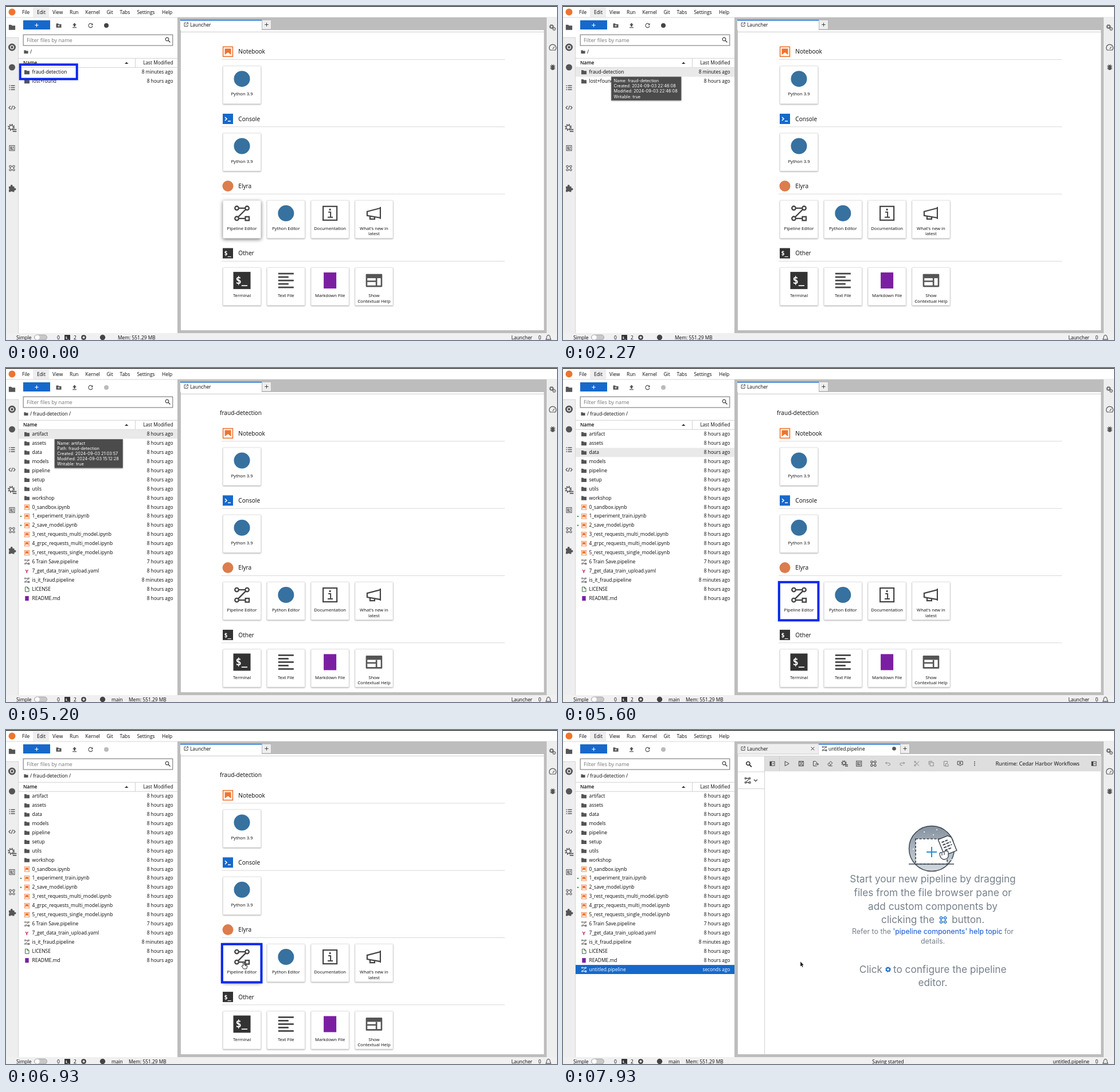
These frames come from a looping animation (961x583 px, 8000 ms). An HTML page:

```html
<!DOCTYPE html>
<html lang="en">
<head>
<meta charset="utf-8">
<title>Notebook workspace</title>
<style>
html, body { margin: 0; width: 100%; height: 100%; overflow: hidden; background: #fff; }
svg { display: block; font-family: "Open Sans", "Noto Sans", sans-serif; }
.card { filter: drop-shadow(0 1px 1px #0005); }
.lift { filter: drop-shadow(0 2px 3px #0008); }
.sans { font-family: Inter, "Liberation Sans", sans-serif; }
.mono { font-family: "DejaVu Sans Mono", monospace; font-weight: bold; }
</style>
</head>
<body>
<svg id="stage" width="961" height="583" viewBox="0 0 961 583"></svg>
<script>
const INK = "#0a0a0a", ICON = "#555", BLUE = "#1669cb", ORANGE = "#ee7430", PURPLE = "#7b1fa2";
const LOOP = 8000;

// Drawing helpers
const text = (x, y, s, size = 8.4, fill = INK, more = "") =>
  `<text x="${x}" y="${y}" font-size="${size}" fill="${fill}" ${more}>${s}</text>`;
const END = 'text-anchor="end"', MID = 'text-anchor="middle"', SANS = 'class="sans"';
const rect = (x, y, w, h, fill = "none", stroke = "none", sw = 1, more = "") =>
  `<rect x="${x}" y="${y}" width="${w}" height="${h}" fill="${fill}" stroke="${stroke}" stroke-width="${sw}" ${more}/>`;
const disc = (x, y, r, fill = "none", stroke = "none", sw = 1) =>
  `<circle cx="${x}" cy="${y}" r="${r}" fill="${fill}" stroke="${stroke}" stroke-width="${sw}"/>`;
const line = (d, stroke = ICON, sw = 1, more = "") =>
  `<path d="${d}" fill="none" stroke="${stroke}" stroke-width="${sw}" ${more}/>`;
const fill = (d, color = ICON) => `<path d="${d}" fill="${color}"/>`;
const at = (x, y, body, k = 1, turn = 0) =>
  `<g transform="translate(${x} ${y}) scale(${k}) rotate(${turn})">${body}</g>`;

// Icons, centred on the origin
const folder = c => fill("M-4.5-3.5h3.4l1.1 1.2h4.5v6h-9z", c);
const notebook = rect(-8.4, -8.4, 16.8, 16.8, "#fff", ORANGE, 1.6) + fill("M-5.5-5.5h11v11l-5.4-4.3-5.6 4.3z", ORANGE);
const terminal = rect(-15, -15, 30, 30, "#333") + text(-11, 6, "$_", 17, "#fff", 'class="mono"');
const consoleIcon = rect(-9, -9, 18, 18, BLUE) + line("M-5-3l3 3-3 3M0 4h5", "#fff", 1.6);
const pipeline = (c = "#444", w = 2.3) =>
  line("M-6-9H6M7-7L-7 7M-6 9H6", c, w) +
  [[-9, -9], [9, -9], [-9, 9]].map(p => disc(...p, 3.3, "none", c, w)).join("") +
  rect(6, 6, 6.5, 6.5, "none", c, w);
const info = rect(-12, -12, 24, 24, "none", "#444", 2.2) +
  line("M-3-2H1V7M-4 7H5", "#444", 2) + rect(-1.5, -8, 3, 3, "#444");
const horn = line("M-12-3L11-9V8L-12 4zM-7 5v5h8V7M11-11V10", "#444", 2.2);
const lines = line("M-13.5-12H13.5M-13.5-6H4.5M-13.5 0H13.5M-13.5 6H4.5M-13.5 12H13.5", "#444", 2.8);
const help = line("M-13-10H13V10H-13zM-13 1.4H3.5M4.2-4V10", ICON, 2.6, 'stroke-linejoin="round"') + rect(-13, -10, 26, 6, ICON);
const python = disc(0, 0, 14, "#37719f");
const markdown = rect(-11, -14, 22, 28, PURPLE);
const search = (c = "#444") => disc(-1, -1, 2.8, "none", c, 1.2) + line("M1 1l3.4 3.4", c, 1.4);
const gear = (c = ICON, w = 1.5) =>
  disc(0, 0, 3, "none", c, w) +
  `<circle r="4.4" fill="none" stroke="${c}" stroke-width="1.5" stroke-dasharray="1.73"/>`;
const links = (c = ICON) => line("M-2-3H2M-2 3H2M-3-2V2M3-2V2", c, .8) +
  [[-3, -3], [3, -3], [-3, 3], [3, 3]].map(p => disc(...p, 1.7, "#fff", c, 1.1)).join("");
const parts = c => rect(-4.5, -4.5, 9, 9, "none", c, 1) + line("M-3-2H0M-3 0H0M-3 2H3M2-3v3", c, 1.3);
const plus = (r, c, w) => line(`M${-r} 0H${r}M0 ${-r}V${r}`, c, w);
const newTab = line("M0-3H-3V3H3V0M1-3.5H3.5V-1M3.5-3.5L-1 1", "#444", .9);
const gearList = c => at(-1, -1, gear(c, 1.2), .9) + line("M1 2h5M1 4.5h5", c, 1.2);

const smallIcon = (name, color) => {
  const ext = name.includes(".") ? name.split(".").pop() : "";
  if (ext == "ipynb") return at(0, 0, notebook, .5);
  if (ext == "pipeline") return at(0, 0, pipeline(color, 2.8), .34);
  if (ext == "yaml") return text(-3, 4, "Y", 9, "#c2185b", 'font-weight="bold"');
  if (ext == "md") return at(0, 0, markdown, .29);
  if (name == "LICENSE") return line("M-3-4H1L3.5-1.5V4H-3zM1-4v2.5h2.5", "#3d6b3d", 1);
  return folder(color);
};

const shell = () => {
  let s = rect(0, 0, 961, 583, "#fff") + rect(0, 0, 961, 1.2, "#111") + rect(47, 2, 28, 17.5, "#eee");
  s += disc(10.5, 10.5, 6, ORANGE);
  [["File", 28], ["Edit", 54], ["View", 81], ["Run", 111], ["Kernel", 138.5], ["Git", 175.5],
   ["Tabs", 198.5], ["Settings", 228.5], ["Help", 272]].forEach(([m, x]) => s += text(x, 14.2, m));
  s += rect(0, 55, 22, 517, "#eee") + line("M0 20H961M21.7 55V571M0 55H22", "#ccc", .8);
  s += rect(299, 20, 645, 552, "#bdbdbd") + rect(943, 20, 18, 552, "#eee");
  s += rect(0, 571, 961, 12, "#f0f0f0");
  s += at(10.5, 37, folder(), 1.25);
  s += disc(10.5, 72, 5, "#fff", ICON, 3) + rect(8.5, 70, 4, 4, ICON);
  s += disc(10.5, 107, 5.5, ICON);
  s += at(10.5, 142.5, line("M-5-3.5h1.6M-5 0h1.6M-5 3.5h1.6M-2-3.5H5M-2 0H5M-2 3.5H5", ICON, 1.3));
  s += at(10.5, 177.5, line("M-2.5-3l-3 3 3 3M2.5-3l3 3-3 3M1-3.5L-1 3.5", ICON, 1.2));
  s += at(10.5, 213, gearList(ICON), 1.3) + at(10.5, 248, parts(ICON)) + at(10.5, 283, links());
  s += at(10.5, 318, fill("M-5.5-3h3a2 2 0 1 1 3.5 0h3v3a2 2 0 1 1 0 3.5v3H1a2 2 0 0 0-3.5 0h-3V3a2 2 0 0 0 0-3z"));
  s += at(951.5, 36, gear(), .8) + at(956, 40, gear(), .65);
  s += at(953.5, 73, line("M-4.5 4A6 6 0 1 1 4.5 4zM0 2L3-2", ICON, 1.2));
  s += at(953.5, 107, line("M-4.5-2.5h9M-4.5 0h9M-4.5 2.5h9M-2.5-5L0-3 2.5-5", ICON, 1) + rect(-2.8, -3.8, 5.6, 8.5, ICON, "none", 1, 'rx="2.5"'));
  return s;
};

const statusBar = st => text(18, 581.5, "Simple") +
  rect(49.5, 574, 22, 9, "#c8c8c8", "#999", .8, 'rx="4.5"') + disc(54.5, 578.5, 4, "#fff") +
  text(89, 581.5, "0") + at(107, 579, terminal, .33) + text(118, 581.5, "2") +
  at(135.5, 578.5, rect(-2.6, -2.6, 5.2, 5.2, "none", "#333", 1.6) + disc(0, 0, 4, "none", "#333", 1)) +
  disc(168.5, 578.5, 4.7, "#444") +
  (st.branch ? text(184, 581.5, "main") : "") +
  text(st.branch ? 214 : 195, 581.5, "Mem: 551.29 MB") +
  (st.saving ? text(567, 581.5, "Saving started", 8.4, INK, MID) : "") +
  text(918, 581.5, st.tab ? "untitled.pipeline" : "Launcher", 8.4, INK, END) + text(928.5, 581.5, "0") +
  at(946, 578.5, line("M-4.5 3.5C-2 1-4-4 0-4S2 1 4.5 3.5zM-1 5H1", "#333", 1));

// File browser
const ROOT = ["fraud-detection", "lost+found"];
const PROJECT = ("artifact,assets,data,models,pipeline,setup,utils,workshop,0_sandbox.ipynb,1_experiment_train.ipynb," +
  "2_save_model.ipynb,3_rest_requests_multi_model.ipynb,4_grpc_requests_multi_model.ipynb," +
  "5_rest_requests_single_model.ipynb,6 Train Save.pipeline,7_get_data_train_upload.yaml," +
  "is_it_fraud.pipeline,LICENSE,README.md").split(",");
const AGES = {
  "fraud-detection": "8 minutes ago", "is_it_fraud.pipeline": "8 minutes ago",
  "6 Train Save.pipeline": "7 hours ago", "untitled.pipeline": "seconds ago"
};

const browser = st => {
  let s = rect(30, 25, 47, 16, BLUE) + at(53.5, 33.5, plus(3.2, "#fff", 1.1));
  s += at(92, 34, folder()) + at(92, 34.5, plus(1.8, "#fff", .9));
  s += at(119.5, 34, fill("M0-4.5L3.5-.8H1.4V2h-2.8V-.8h-2.1zM-3.5 3h7v1.3h-7z"));
  s += at(147.5, 34, line("M3-2A3.6 3.6 0 1 0 3.5 1", ICON, 1.2) + fill("M4-4v3.5H.5z"));
  s += disc(175, 34, 4, st.dim ? "#bbb" : "#444");
  s += rect(30.2, 50.2, 260.5, 18.8, "#fff", "#8c8c8c", 1.3) + text(36, 63, "Filter files by name", 9.1, "#777");
  s += at(282, 59, search()) + at(35, 80, folder(), .8);
  s += text(42, 82.8, st.dir ? "/ fraud-detection /" : "/");
  s += line("M22 91.3H299M22 107.3H299M225.5 91V107", "#ccc", .9);
  s += text(30, 102, "Name", 8.4, INK, 'font-weight="600"') + fill("M207 101l3.2-3.3 3.2 3.3z", "#333");
  s += text(291.5, 102, "Last Modified", 8.3, INK, END);
  const names = st.dir ? PROJECT.concat(st.file ? ["untitled.pipeline"] : []) : ROOT;
  names.forEach((name, i) => {
    const y = 115.4 + 15.92 * i, on = i == st.sel, ink = on ? "#fff" : INK;
    if (on || i == st.hover) s += rect(22, y - 7.8, 277, 15.9, on ? BLUE : "#e9e9e9");
    if (st.dir && (i == 9 || i == 10)) s += disc(26, y + .2, 1.2, "#388e3c");
    s += at(36.5, y + .2, smallIcon(name, on ? "#fff" : ICON));
    s += text(45.5, y + 2.8, name, 8.45, ink) + text(291.5, y + 2.8, AGES[name] || "8 hours ago", 8.3, ink, END);
  });
  return s;
};

// Launcher
const SECTIONS = [
  ["Notebook", notebook, [["Python 3.9", python]]],
  ["Console", consoleIcon, [["Python 3.9", python]]],
  ["Elyra", disc(0, 0, 9.5, "#dd7c4c"), [["Pipeline Editor", pipeline()], ["Python Editor", python],
    ["Documentation", info], ["What's new in|latest", horn]]],
  ["Other", at(0, 0, terminal, .6), [["Terminal", terminal], ["Text File", lines],
    ["Markdown File", markdown], ["Show|Contextual Help", help]]]
];

const tab = (x, label, icon, active) =>
  rect(x, 24, 142, 18, active ? "#fff" : "#eee", active ? "none" : "#bbb", .7) +
  (active ? rect(x, 24, 142, 1.5, BLUE) : "") + at(x + 10, 32.5, icon) + text(x + 17, 35.5, label);
const addTab = x => rect(x + .5, 24.3, 16, 16.5, "#eee", "#aaa", .7) + at(x + 8.5, 32.5, plus(3.2, "#333", .9));
const panel = rect(304.3, 41.5, 634.5, 525, "#fff", "#adadad", .7) + line("M304 45.3H939", "#bbb", .8);

const launcher = st => {
  const dy = st.moved ? 34.3 : 0;
  let s = panel + tab(304, "Launcher", newTab, true) + addTab(446);
  if (st.moved) s += text(373, 82.2, "fraud-detection", 10.1);
  SECTIONS.forEach(([title, icon, cards], i) => {
    const y = 79.7 + 117.3 * i + dy;
    s += at(387, y, icon) + text(405.3, y + 3.7, title, 10.1);
    s += rect(376, y + 13.4, 494, .9, "#d5d5d5");
    cards.forEach(([label, pic], j) => {
      const x = 378.5 + 76.8 * j, lifted = st.lift && i == 2 && j == 0;
      s += rect(x, y + 25, 66, 66, "#fff", "#ddd", .7, `class="${lifted ? "lift" : "card"}" rx="1"`);
      s += at(x + 33, y + 47.5, pic);
      label.split("|").forEach((l, n) => s += text(x + 33, y + 76.7 + 9.4 * n, l, 7.7, INK, MID));
    });
  });
  return s;
};

// Pipeline editor
const TOOLS = [
  c => rect(-4, -3.5, 8, 7, "none", c) + rect(-4, -3.5, 3, 7, c) + line("M0 0h3", c),
  c => line("M-3-4L4 0-3 4z", c),
  c => rect(-4, -4, 8, 8, "none", c) + line("M-2-4v2.5h4V-4M-2 4V1h4v3", c),
  c => line("M2 4H-4V-4H0L2-2V0M-1 1H5M3-1L5 1 3 3", c),
  c => line("M-4 1L1-4 4-1-1 4H-2zM-2-1L1 2M-1 4H4", c),
  gearList, parts, links,
  c => line("M-2-3L-4-1-2 1M-4-1H2A2 2 0 0 1 2 3H0", c),
  c => line("M2-3L4-1 2 1M4-1H-2A2 2 0 0 0-2 3H0", c),
  c => line("M-2-2L4 4M-2 2L4-4", c) + disc(-3, -3, 1.3, "none", c) + disc(-3, 3, 1.3, "none", c),
  c => line("M-2-2H4V4H-2zM-4 2V-4H2", c),
  c => line("M-3-4H3V-1M-3-4V4H0M0 0H3L4.5 1.5V4.5H0z", c),
  c => line("M-4.5-4H4.5V2H1L0 4-1 2H-4.5zM-2-1H2M0-3V1", c),
  c => disc(0, -3, .9, c) + disc(0, 0, .9, c) + disc(0, 3, .9, c)
];

const emptyArt = () => {
  const dark = "#3d4753", gray = "#77818b", link = "#0f54d0";
  const big = (x, y, s, more = MID) => text(x, y, s, 17.2, gray, SANS + " " + more);
  let s = `<defs><linearGradient id="sky" x2="0" y2="1"><stop stop-color="#84919e"/><stop offset="1" stop-color="#d3d9df"/></linearGradient></defs>`;
  s += disc(643, 207, 39.5, "url(#sky)", dark, 1.5);
  s += [[630, 178], [646, 183], [652, 174], [611, 208], [677, 226]].map(p => disc(...p, 1, "#fff")).join("");
  s += rect(615, 190, 55, 44, "#fff", dark, 1.7, 'stroke-dasharray="4 2.5"') + line("M603 234H682", dark, 1.6);
  s += at(643, 213, plus(9, "#1f8fd6", 2));
  s += at(670, 201, line("M-11-15H7L12-10V15H-11z", dark, 1.5, 'style="fill:#fff"') +
    line("M-7-8H4M-7-3H8M-7 2H8M-7 7H6", dark, 2, 'stroke-dasharray="5 1.5"'), 1, -22);
  s += line("M657 217q-1-3 3-3l8-3q5 0 4 5v5q-2 5-8 5-6-1-7-9zM661 215v4M665 213v5", dark, 1.3, 'style="fill:#fff"');
  ["Start your new pipeline by dragging", "files from the file browser pane or", "add custom components by"]
    .forEach((l, i) => s += big(645, 265.7 + 23.9 * i, l));
  s += big(648, 337.4, "clicking the", END) + at(663, 331.5, links(BLUE), 1.2) + big(678, 337.4, "button.", "");
  s += text(645, 355.6, `Refer to the <tspan fill="${link}">'pipeline components' help topic</tspan> for`, 12.4, gray, SANS + " " + MID);
  s += text(645, 372.8, "details.", 12.4, gray, SANS + " " + MID);
  s += big(557, 423.5, "Click", END) + at(567, 418, gear(BLUE, 2), .95) + big(576, 423.5, "to configure the pipeline", "");
  return s + big(645, 447.3, "editor.");
};

const editor = st => {
  let s = panel + tab(304, "Launcher", newTab) + at(435.5, 32.5, line("M-2.8-2.8L2.8 2.8M-2.8 2.8L2.8-2.8", "#333", 1));
  s += tab(446, "untitled.pipeline", at(0, 0, pipeline("#444", 2.8), .32), true) + disc(577.5, 32.5, 3.3, "#555") + addTab(588);
  if (st.tools) {
    s += rect(352, 45.7, 587, 26.5, "#dedede") + line("M351.6 45V566M304 73H352M304 102.5H352M377.5 46V72", "#ccc", .9);
    s += at(324, 59.5, search("#111"), 1.1) + at(322, 88, pipeline("#444", 2.8), .4) + line("M333 86.5l3 3 3-3", "#333", 1.1);
    TOOLS.forEach((draw, i) => s += at(365 + 25.2 * i, 58.7, draw(i > 7 && i < 13 ? "#888" : "#444")));
    s += text(901, 62, "Runtime: Cedar Harbor Workflows", 9.2, INK, END) + at(926, 58.7, TOOLS[0]("#444"));
  }
  return s + (st.art ? emptyArt() : "");
};

// Overlays
const TIPS = [, [84.3, 123.8, 121.7, 40.8, ["Name: fraud-detection", "Created: 2024-09-03 22:46:08", "Modified: 2024-09-03 22:46:08"]],
  [85, 124.5, 118.5, 49.7, ["Name: artifact", "Path: fraud-detection", "Created: 2024-09-03 21:03:57", "Modified: 2024-09-03 15:12:28"]],
  [84, 155.5, 120, 49.7, ["Name: data", "Path: fraud-detection", "Created: 2024-09-03 21:03:57", "Modified: 2024-09-03 15:12:28"]]];
const BOXES = [, [24.7, 102.3, 99, 25.2], [376.8, 373.8, 68.6, 66.6]];

const overlays = st => {
  let s = "";
  if (st.tip) {
    const [x, y, w, h, rows] = TIPS[st.tip];
    s += rect(x, y, w, h, "#4b4b4b", "#666", .7, 'class="card"');
    [...rows, "Writable: true"].forEach((r, i) => s += text(x + 4.3, y + 9.1 + 9.2 * i, r, 7.3, "#fff", SANS));
  }
  if (st.box) s += rect(...BOXES[st.box], "none", "#0528f0", 4);
  if (st.hand) s += at(...st.hand, line("M-2.5 1V-5.5q1.2-1.2 2 0V-1.5L4-.5q1 .5 .8 2L3.5 6H-1.5L-5 1.5q0-1.5 2.5-.5zM1.2-1v2M3-.5v2", "#222", 1, 'style="fill:#fff"'));
  if (st.arrow) s += `<path d="M414 404v9l2-1.8 1.5 3 1.4-.7-1.4-2.9h2.6z" fill="#111" stroke="#fff" stroke-width=".4"/>`;
  return s;
};

// Each cue changes part of the state and holds until the next one
const CUES = [
  [0, { box: 1, lift: 1, hover: -1, sel: -1 }],
  [70, { lift: 0 }], [130, { hover: 0 }], [730, { tip: 1 }], [2270, { box: 0 }],
  [4270, { tip: 0, sel: 0 }],
  [4730, { dir: 1, sel: -1 }], [4800, { moved: 1 }], [4930, { branch: 1, dim: 1 }], [5000, { tip: 2 }],
  [5400, { tip: 0, hover: 1 }], [5470, { hover: 2 }], [5600, { box: 2 }], [5870, { tip: 3 }], [6200, { tip: 0 }],
  [6330, { hover: 3 }], [6470, { hover: 5 }], [6530, { hover: 8 }], [6600, { hover: 12 }], [6670, { hover: -1 }],
  [6730, { lift: 1 }], [6870, { hand: [418, 414] }], [6930, { hand: [416, 411] }],
  [7530, { box: 0 }], [7600, { file: 1, sel: 19 }], [7670, { tab: 1, hand: 0, arrow: 1 }],
  [7730, { tools: 1 }], [7870, { art: 1 }], [7930, { saving: 1 }]
];

const stage = document.getElementById("stage"), base = shell();
let shown = 0;
function draw(now) {
  const past = CUES.filter(([start]) => start <= now % LOOP);
  if (past.length != shown) {
    shown = past.length;
    const st = Object.assign({}, ...past.map(cue => cue[1]));
    stage.innerHTML = base + browser(st) + (st.tab ? editor(st) : launcher(st)) + statusBar(st) + overlays(st);
  }
}
const begin = performance.now();
function tick() {
  draw(performance.now() - begin);
  requestAnimationFrame(tick);
}
tick();
</script>
</body>
</html>
```
